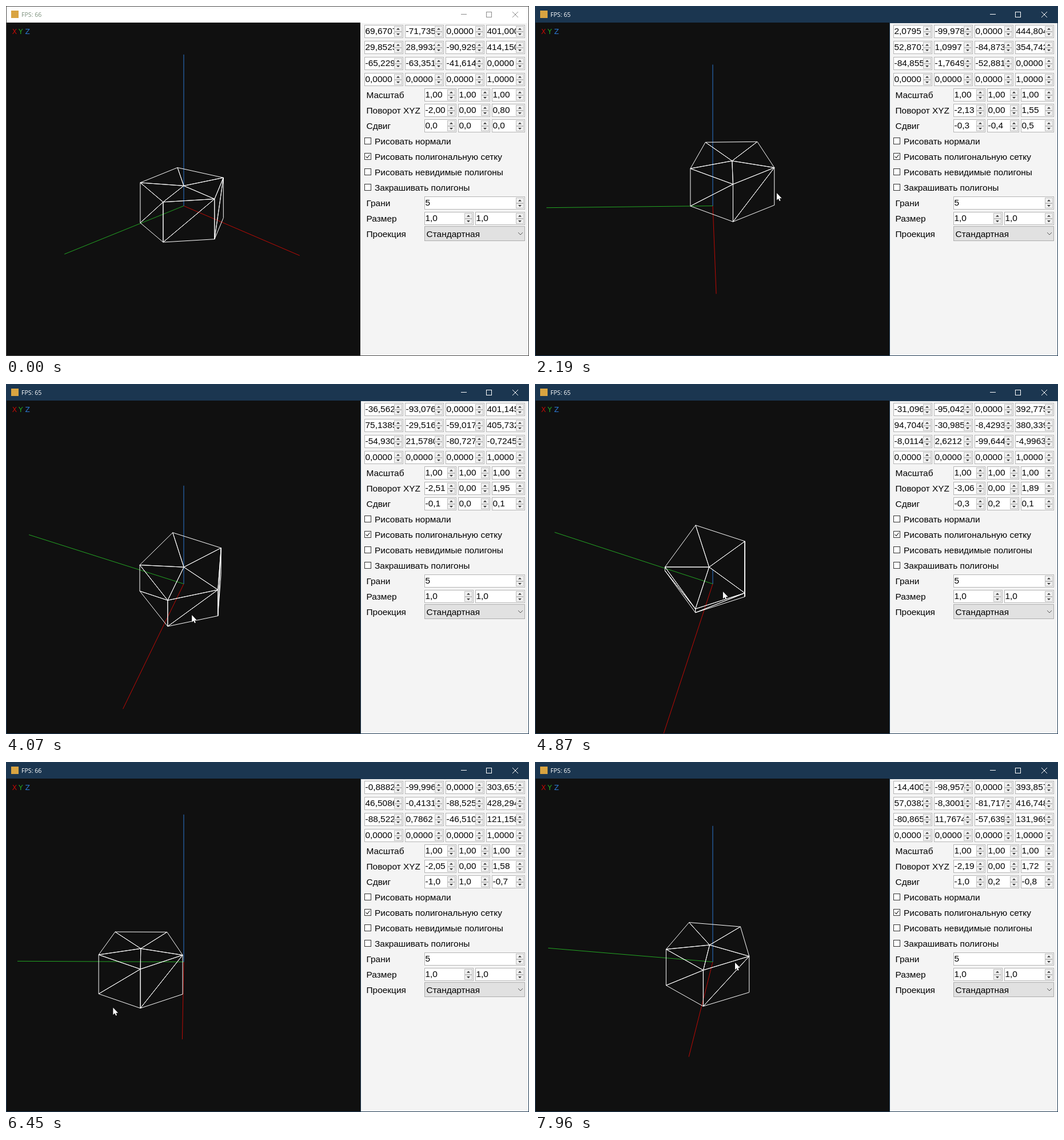
Animation, 915 px wide and 612 px high, one loop 7990 ms. Source, as an HTML page with a canvas:

```html
<!DOCTYPE html>
<html lang="ru">
<head>
<meta charset="utf-8">
<style>
html, body { margin: 0; width: 915px; height: 612px; overflow: hidden; background: #101010; }
canvas { display: block; }
</style>
</head>
<body>
<canvas id="stage" width="915" height="612"></canvas>
<script>
const g = document.getElementById('stage').getContext('2d');
const { sin, cos, PI } = Math;
const LOOP = 7990, STEP = 30, START = 30, ACTIVE = 150;
const SCALE = .7724, UNIT = 100 * SCALE, AXIS = 291 / UNIT, OX = 311, OY = 349.5;
const UI = '15.45px "Liberation Sans", Arial, sans-serif';

// Pointer gestures, each starting where the one before ends: end time, kind, travel.
// A turn changes the angles by .01 per unit, a pan slides the solid in the view plane.
const gestures = [
  [150, 'move', -55, 55],
  [1000, 'turn', -80.55, 44.67],
  [1700, 'turn', 5.55, -31.87],
  [2200, 'pan', 46.6, -63.2],
  [2500, 'turn', -47, -46.8],
  [2800, 'turn', -2.25, -6.65],
  [3240, 'move', -33.7, 17.1],
  [3490, 'pan', -56.1, 48.1],
  [4400, 'turn', 15.55, 146.37],
  [4640, 'move', 7, -80.7],
  [4870, 'pan', -8, -27],
  [5080, 'pan', -24, -82],
  [5200, 'move', -160, 184],
  [5780, 'turn', 67.72, -135.87],
  [6130, 'pan', -30, 84.3],
  [6540, 'turn', -50.55, 48.66],
  [6600, 'move', 148.4, -126.5],
  [6930, 'pan', -30.3, 106.2],
  [7390, 'move', 0, 0],
  [7960, 'pan', 106, -94.8]
];

const rotation = (tilt, turn) => [
  [cos(turn), -sin(turn), 0],
  [-cos(tilt) * sin(turn), -cos(tilt) * cos(turn), sin(tilt)],
  [sin(tilt) * sin(turn), sin(tilt) * cos(turn), cos(tilt)]
];

function stateAt(t) {
  let tilt = -2, turn = .8, move = [0, 0, 0], px = 489.5, py = 320.5, from = START;
  for (const [end, kind, x, y] of gestures) {
    if (t <= from) break;
    const f = Math.min(1, (t - from) / (end - from)), dx = x * f, dy = y * f;
    if (kind === 'turn') {
      turn -= dx / 100;
      tilt -= dy / 100;
    } else if (kind === 'pan') {
      const [right, down] = rotation(tilt, turn);
      move = move.map((v, i) => v + (right[i] * dx + down[i] * dy) / 100);
    }
    px += dx * SCALE;
    py += dy * SCALE;
    from = end;
  }
  return { tilt, turn, move, px, py, rows: rotation(tilt, turn) };
}

const num = (v, n) => (+v.toFixed(n) || 0).toFixed(n).replace('.', ',');

function text(s, x, y, color = '#000', font = UI) {
  g.font = font;
  g.fillStyle = color;
  g.fillText(s, x, Math.round(y));
}

function path(points, color, width = 1, closed = false) {
  g.beginPath();
  points.forEach(([x, y]) => g.lineTo(x, y));
  if (closed) g.closePath();
  g.strokeStyle = color;
  g.lineWidth = width;
  g.stroke();
}

function box(x, y, w, h, fill, edge) {
  g.fillStyle = fill;
  g.fillRect(x, y, w, h);
  g.strokeStyle = edge;
  g.lineWidth = 1;
  g.strokeRect(x + .5, y + .5, w - 1, h - 1);
}

function triangle(x, y, dir) {
  g.beginPath();
  g.moveTo(x - 3, y + dir * 1.5);
  g.lineTo(x + 3, y + dir * 1.5);
  g.lineTo(x, y - dir * 1.5);
  g.fillStyle = '#333';
  g.fill();
}

function field(x, cy, w, value) {
  const top = Math.round(cy) - 11, bx = x + w - 16;
  box(x, top, w, 23, '#fff', '#b4b4b4');
  g.save();
  g.beginPath();
  g.rect(x + 1, top, w - 17, 23);
  g.clip();
  text(value, x + 1.5, cy + 5.3);
  g.restore();
  box(bx, top + 2, 14, 10, '#f0f0f0', '#c0c0c0');
  box(bx, top + 12, 14, 9, '#f0f0f0', '#c0c0c0');
  triangle(bx + 7, top + 7, 1);
  triangle(bx + 7, top + 16.5, -1);
}

function titleBar(t) {
  const on = t >= ACTIVE, ink = on ? '#fff' : '#8a8a8a';
  g.fillStyle = on ? '#1b3650' : '#fff';
  g.fillRect(0, 0, 915, 30);
  g.fillStyle = '#d9a441';
  g.fillRect(9, 8, 13, 13);
  const fps = !on ? 66 : t < 1300 ? 64 : t < 6200 ? 65 : t < 7600 ? 66 : 65;
  text('FPS: ' + fps, 27, 19, on ? '#fff' : '#7d917d', '10.6px "Open Sans", "Noto Sans", sans-serif');
  path([[796, 14.5], [806, 14.5]], ink);
  g.strokeRect(840.5, 10.5, 9, 9);
  path([[886, 10], [896, 20]], ink);
  path([[896, 10], [886, 20]], ink);
}

function scene({ rows, move }) {
  const project = p => [OX, OY].map((o, i) =>
    o + UNIT * rows[i].reduce((sum, r, j) => sum + r * p[j], 0));
  const place = (...p) => project(p.map((v, i) => v + move[i]));
  g.save();
  g.beginPath();
  g.rect(1, 29, 619, 582);
  g.clip();
  g.fillStyle = '#101010';
  g.fillRect(0, 29, 621, 583);

  ['#be0a05', '#23a523', '#2d78d2'].forEach((color, i) => {
    path([[OX, OY], project([0, 1, 2].map(j => j === i ? AXIS : 0))], color);
    text('XYZ'[i], 10.8 + 11.3 * i, 49, color, '12.3px "DejaVu Sans", sans-serif');
  });

  // Only faces turned to the viewer are drawn.
  const face = (a, b, c) => {
    const facing = (b[0] - a[0]) * (c[1] - a[1]) - (b[1] - a[1]) * (c[0] - a[0]);
    if (facing > 0) path([a, b, c], '#fff', 1, true);
  };
  const rim = (k, z) => place(cos(k * PI * .4), sin(k * PI * .4), z);
  const top = place(0, 0, .5), base = place(0, 0, -.5);
  for (let k = 0; k < 5; k++) {
    const t0 = rim(k, .5), t1 = rim(k + 1, .5), b0 = rim(k, -.5), b1 = rim(k + 1, -.5);
    face(top, t0, t1);
    face(t0, b0, b1);
    face(t0, b1, t1);
    face(base, b1, b0);
  }
  g.restore();
}

function panel({ rows, move, tilt, turn }) {
  g.fillStyle = '#f4f4f4';
  g.fillRect(621, 30, 293, 581);
  const table = rows.map((r, i) => {
    const shift = r.reduce((sum, v, j) => sum + v * move[j], 0);
    return [...r, shift].map((v, j) => 100 * v + (j === 3 ? [401, 414.15, 0][i] : 0));
  });
  table.push([0, 0, 0, 1]);
  table.forEach((r, i) => r.forEach((v, j) =>
    field(Math.round(626.5 + 71 * j), 44 + 27.9 * i, 68, num(v, 4))));

  [['Масштаб', [1, 1, 1], 2], ['Поворот XYZ', [tilt, 0, turn], 2], ['Сдвиг', move, 1]]
    .forEach(([name, values, digits], i) => {
      const cy = 154.6 + 27 * i;
      text(name, 630.5, cy + 6.3);
      values.forEach((v, j) => field(732 + 59 * j, cy, j < 2 ? 56 : 58, num(v, digits)));
    });

  ['Рисовать нормали', 'Рисовать полигональную сетку', 'Рисовать невидимые полигоны', 'Закрашивать полигоны']
    .forEach((name, i) => {
      const y = 236 + 27 * i;
      box(627, y - 6, 12, 12, '#fff', '#333');
      if (i === 1) path([[629.5, y], [632, y + 2.7], [636.5, y - 3]], '#222', 1.1);
      text(name, 645, y + 5.5);
    });

  ['Грани', 'Размер', 'Проекция'].forEach((s, i) => text(s, 630.5, 350.3 + 27 * i));
  field(732, 343.5, 176, '5');
  field(732, 371, 86, '1,0');
  field(821, 371, 87, '1,0');
  box(732, 385, 176, 26, '#e1e1e1', '#adadad');
  text('Стандартная', 735.5, 403.5);
  path([[896, 396], [900, 400], [904, 396]], '#555');
}

function arrow({ px, py }) {
  const outline = [[0, 0], [0, 12.5], [2.9, 9.8], [4.8, 14], [6.7, 13.2], [4.9, 9.2], [8.8, 9.2]];
  path(outline.map(([x, y]) => [px + x, py + y]), '#000', .7, true);
  g.fillStyle = '#fff';
  g.fill();
}

function draw(t) {
  const state = stateAt(t);
  titleBar(t);
  scene(state);
  g.fillStyle = t < ACTIVE ? '#fff' : '#1b3650';
  g.fillRect(620, 29, 295, 583);
  panel(state);
  g.strokeStyle = t < ACTIVE ? '#4a4a4a' : '#1f3a54';
  g.lineWidth = 1;
  g.strokeRect(.5, .5, 914, 611);
  if (t >= START) arrow(state);
}

function tick() {
  const t = performance.now() % LOOP;
  draw(Math.max(0, Math.floor((t - 10) / STEP) * STEP + 10));
  requestAnimationFrame(tick);
}
tick();
</script>
</body>
</html>
```
